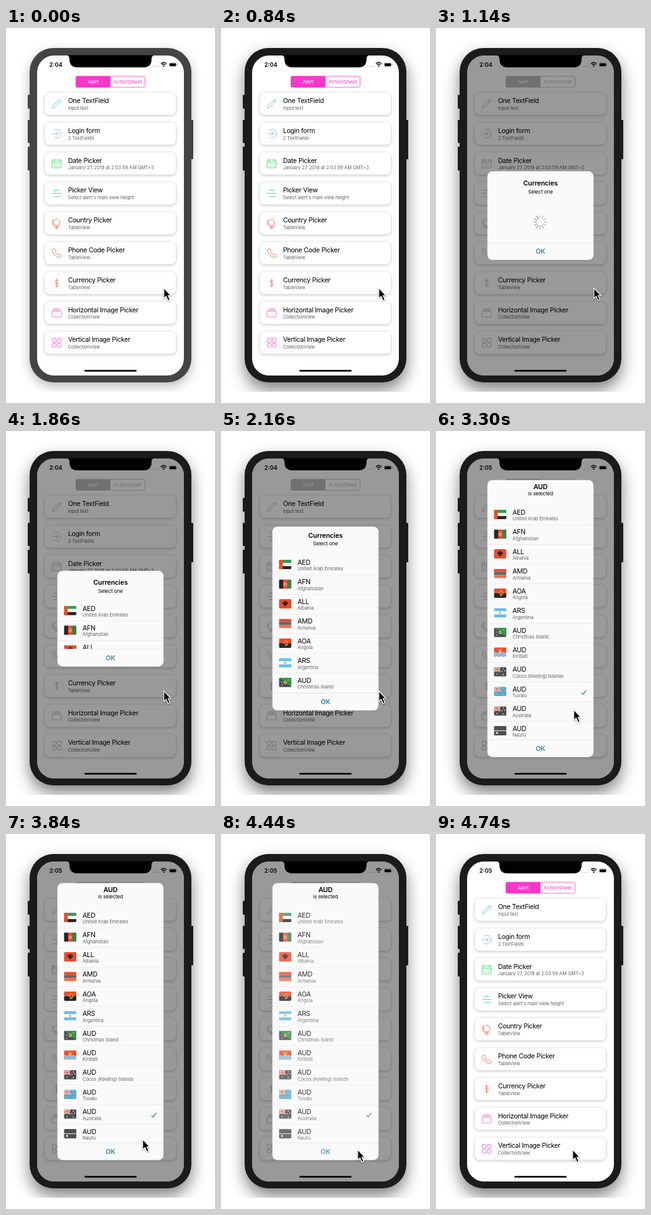
Recreate the animation shown at these times as an HTML page. Size 336 by 600 pixels, loop 4.98 s.

```html
<!DOCTYPE html>
<html lang="en">
<head>
<meta charset="utf-8">
<title>Currency picker</title>
<style>
html, body { margin: 0; width: 100%; height: 100%; overflow: hidden; background: #fff; }
#stage { display: block; width: 100vw; height: 100vh; }
text { font-family: Inter, Roboto, "Liberation Sans", sans-serif; }
.title { font-size: 10.7px; letter-spacing: -.31px; }
.note { font-size: 7.5px; letter-spacing: -.07px; fill: #626262; }
.small { font-size: 8.2px; letter-spacing: -.12px; }
.bold { font-size: 10.7px; font-weight: 600; letter-spacing: -.15px; }
.clock { font-size: 9.2px; font-weight: 600; }
.mid { text-anchor: middle; }
.card { fill: #fff; filter: drop-shadow(0 1.6px 2.6px rgba(0,0,0,.26)); }
.icon { fill: none; stroke-width: .85; stroke-linecap: round; stroke-linejoin: round; }
.tint { stroke: #fa38c8; }
.tintFill { fill: #fa38c8; }
.dim .icon { stroke: #b2b2b2; }
.dim .tint { stroke: #bcb8ba; }
.dim .tintFill { fill: #bcb8ba; }
#body { fill: #444; }
#shadow { opacity: .28; filter: blur(9px); transform: translateY(6px); }
.active #body { fill: #1b1b1b; }
.active #shadow { opacity: .5; filter: blur(13px); transform: translateY(12px); }
#cursor { filter: drop-shadow(0 1px 1px rgba(0,0,0,.35)); }
</style>
</head>
<body>
<svg id="stage" viewBox="0 0 336 600"></svg>
<script>
const LOOP = 4980, STEP = 60;
const stage = document.getElementById('stage');

const text = (x, y, cls, str, extra = '') =>
  `<text x="${x}" y="${y}" class="${cls}" ${extra}>${str}</text>`;
const rect = (x, y, w, h, fill, r = 0) =>
  `<rect x="${x}" y="${y}" width="${w}" height="${h}" rx="${r}" fill="${fill}"/>`;
const path = (d, fill, extra = '') => `<path d="${d}" fill="${fill}" ${extra}/>`;
const dot = (x, y, r, fill) => `<circle cx="${x}" cy="${y}" r="${r}" fill="${fill}"/>`;

// Main list
const BLUE = '#5fc3ee', GREEN = '#45cf6a', ORANGE = '#f2623c', PINK = '#f25ed2';
const cards = [
  ['One TextField', 'Input text', BLUE,
    'M-7 7l1.2-4.2L4.5-6.6q1-.8 2 .2t.2 2L-3.2 5.6zM3-5.4l2.4 2.4'],
  ['Login form', '2 TextFields', BLUE,
    'M-4-5.6a7 7 0 1 1 0 11.2M-7 0H2.5M-.5-3L2.5 0L-.5 3'],
  ['Date Picker', 'January 27, 2018 at 2:03:59 AM GMT+3', GREEN,
    'M-7-5.5h14v12.5h-14zM-7-2.2h14M-4-7v3M4-7v3M-4.4.8h1M-1.4.8h1M1.6.8h1M4.4.8h.6M-4.4 4h1M-1.4 4h1M1.6 4h1'],
  ['Picker View', "Select alert's main view height", GREEN, 'M-4.5-5H4M-7 0H7M-4 5H6'],
  ['Country Picker', 'TableView', ORANGE,
    'M5.2-1.2a5.2 5.2 0 1 0-10.4 0a5.2 5.2 0 1 0 10.4 0M-4.9-6.2A7 7 0 1 0 5 3.8M0 6v1.8M-3 7.8h6'],
  ['Phone Code Picker', 'TableView', ORANGE,
    'M-6.5-5.5q2-2.5 3.3-1l2 2.6q.6 1-.8 2.2q1 3 4.2 4.3q1.3-1.5 2.3-.8l2.6 1.8q1.3 1.2-1 3q-2 1.5-6-1q-5-3.2-6.6-7.3q-.7-2.2 0-3.8z'],
  ['Currency Picker', 'TableView', ORANGE,
    'M2.6-2.6q-.4-2-2.6-2q-2.6 0-2.6 2.2q0 1.9 2.6 2.4q2.6.6 2.6 2.4q0 2.2-2.6 2.2q-2.4 0-2.6-2M0-6.6V6.6'],
  ['Horizontal Image Picker', 'CollectionView', PINK,
    'M-6.5-2.5h13q1 0 1 1v7q0 1-1 1h-13q-1 0-1-1v-7q0-1 1-1zM-6.3-4.6h12.6M-4.6-6.6h9.2'],
  ['Vertical Image Picker', 'CollectionView', PINK,
    [[-7, -7], [1, -7], [-7, 1], [1, 1]].map(([x, y]) =>
      `M${x + 1.5} ${y}h3q1.5 0 1.5 1.5v3q0 1.5-1.5 1.5h-3q-1.5 0-1.5-1.5v-3q0-1.5 1.5-1.5z`).join('')]
];

const cardMarkup = ([title, note, color, icon], i) => {
  const y = 103.5 + 47.8 * i;
  return `<rect class="card" x="62.5" y="${y}" width="210.5" height="35.5" rx="7.5"/>
    <path class="icon" d="${icon}" stroke="${color}" transform="translate(81.5 ${y + 17.7})"/>` +
    text(99.7, y + 16.4, 'title', title) + text(99.7, y + 27.2, 'note', note);
};

// Flags, 20 by 15
const RED = '#ee4b2b', INK = '#262626', NAVY = '#4a4d52', SKY = '#62bff0', GOLD = '#f3b64a';
const bands = (...colors) =>
  colors.map((c, i) => rect(0, i * 15 / colors.length, 20, 15 / colors.length + .1, c)).join('');
const jack = path('M0 0L10 7.5M10 0L0 7.5M5 0V7.5M0 3.75H10', 'none', 'stroke="#fff" stroke-width="2"') +
  path('M0 0L10 7.5M10 0L0 7.5M5 0V7.5M0 3.75H10', 'none', `stroke="${RED}" stroke-width=".9"`);
const stars = color => [[15, 2.8], [12.7, 6.8], [17.3, 6], [15, 12], [5, 11.3]]
  .map(([x, y]) => dot(x, y, .85, color)).join('');

const rows = [
  ['AED', 'United Arab Emirates', bands('#2f9e4f', '#fff', INK) + rect(0, 0, 6, 15, RED)],
  ['AFN', 'Afghanistan', rect(0, 0, 7, 15, INK) + rect(6.7, 0, 7, 15, RED) +
    rect(13.3, 0, 7, 15, '#35804a') + dot(10, 7.5, 2.6, '#f3b3a4') + dot(10, 7.5, 1.3, RED)],
  ['ALL', 'Albania', bands(RED) +
    path('M10 4L8.5 2.6 7.7 4 9 5.5 5.5 4.5 6 8 8.5 9 7.5 11 9.2 10.5 10 12.8 10.8 10.5 12.5 11 11.5 9 14 8 14.5 4.5 11 5.5 12.3 4 11.5 2.6z', INK)],
  ['AMD', 'Armenia', bands(RED, '#66666a', '#f2704c')],
  ['AOA', 'Angola', bands(RED, INK) +
    path('M9 4.5a3.6 3.6 0 1 1 0 6.5M7 6l6 5', 'none', `stroke="${GOLD}" stroke-width="1.1"`)],
  ['ARS', 'Argentina', bands(SKY, '#fff', SKY) + dot(10, 7.5, 2, GOLD)],
  ['AUD', 'Christmas Island', bands(NAVY) + path('M0 0H20V15z', '#35924d') +
    dot(10, 7.5, 2.6, GOLD) + dot(10, 7.5, 1.2, '#35924d') + path('M13 4l4-1.5-1.5 2z', GOLD) +
    dot(4, 7, .8, '#fff') + dot(5, 11.5, .8, '#fff')],
  ['AUD', 'Kiribati', bands(RED) + dot(10, 7, 2.6, GOLD) + path('M6 3.5q2-1.5 4 .5q2-2 4-.5', 'none', `stroke="${GOLD}"`) +
    rect(0, 8, 20, 7, '#4c8fbe') + [9, 11.4, 13.8].map(y =>
      path(`M0 ${y}q1.7-1.6 3.3 0t3.3 0 3.4 0 3.3 0 3.4 0 3.3 0`, 'none', 'stroke="#fff" stroke-width="1"')).join('')],
  ['AUD', 'Cocos (Keeling) Islands', bands(NAVY) + jack + stars('#fff')],
  ['AUD', 'Tuvalu', bands('#5aa9cf') + jack + stars(GOLD)],
  ['AUD', 'Australia', bands(NAVY) + jack + stars('#fff')],
  ['AUD', 'Nauru', bands(NAVY) + rect(0, 6.8, 20, 1.4, '#d9c9a4') + dot(5, 11, 1.5, '#fff')]
];
const PITCH = 31.45;

const rowMarkup = ([code, place, flag], i) => `<g transform="translate(0 ${i * PITCH})">
  ${i ? rect(0, 0, 171, .5, '#dedede') : ''}
  <g transform="translate(10.6 7.6)" clip-path="url(#flagClip)">${flag}</g>
  ${text(40.4, 15.4, 'title', code)}${text(40.4, 24.8, 'note', place)}</g>`;

const spokes = Array.from({ length: 12 }, (_, i) =>
  `<rect x="-.8" y="-11.5" width="1.6" height="6" rx=".8" fill="#777"
    opacity="${.22 + .5 * i / 11}" transform="rotate(${i * 30})"/>`).join('');

stage.innerHTML = `
<defs>
  <clipPath id="stageClip"><rect width="336" height="582"/></clipPath>
  <clipPath id="screenClip"><rect x="50" y="44" width="236" height="512" rx="27"/></clipPath>
  <clipPath id="flagClip"><rect width="20" height="15" rx="1.8"/></clipPath>
</defs>
<g clip-path="url(#stageClip)"><rect id="shadow" x="38" y="32" width="260" height="535" rx="38"/></g>
<g id="body">
  <rect x="38" y="32" width="260" height="535" rx="38"/>
  <rect x="35" y="107" width="6" height="22" rx="1"/>
  <rect x="35" y="147" width="6" height="37" rx="1"/>
  <rect x="35" y="190" width="6" height="38" rx="1"/>
  <rect x="295" y="147" width="6" height="63" rx="1"/>
</g>
<g clip-path="url(#screenClip)">
  ${rect(50, 44, 236, 512, '#fff')}
  ${text(69.8, 62.2, 'clock', '2:04', 'id="clock"')}
  ${[0, 1, 2, 3].map(i => dot(236 + i * 2.9, 61.2, .75, '#b0b0b0')).join('')}
  ${path('M249 57.2q4.6-4.2 9.2 0M250.7 59q2.9-2.5 5.8 0', 'none', 'stroke="#000" stroke-width="1.4"')}
  ${path('M252 60.6q1.6-1.3 3.2 0l-1.6 1.8z', '#000')}
  <rect x="262.3" y="55.8" width="11.6" height="6" rx="1.6" fill="none" stroke="#888" stroke-width=".5"/>
  ${rect(263, 56.5, 10.2, 4.6, '#000', 1)}${rect(274.6, 57.8, .8, 2, '#888', .4)}
  <rect class="tint" x="112.5" y="77.2" width="111" height="17.6" rx="2.6" fill="none" stroke-width=".8"/>
  <path class="tintFill" d="M168 77v18h-53q-3 0-3-3v-12q0-3 3-3z"/>
  ${text(140, 89, 'small mid', 'Alert', 'fill="#fff"')}
  ${text(195.7, 89, 'small mid tintFill', 'ActionSheet')}
  ${cards.map(cardMarkup).join('')}
  ${rect(126, 547, 84, 2.8, '#000', 1.4)}
  <rect id="veil" x="50" y="44" width="236" height="512"/>
</g>
<use href="#notch"/>
<g id="alert">
  <rect id="panel" x="82.6" width="170.6" rx="8" fill="#fafafa"/>
  ${text(168, 0, 'bold mid', '', 'id="heading"')}
  ${text(168, 0, 'small mid', '', 'id="detail"')}
  <g id="spinner">${spokes}</g>
  <svg id="table" x="82.6" width="170.6">${rows.map(rowMarkup).join('')}
    <path id="check" d="M151.2 17l2.8 2.9 5-6.8" fill="none" stroke="#3c8fbe" stroke-width="1.4"/></svg>
  <rect id="rule" x="82.6" width="170.6" height=".5" fill="#d8d8d8"/>
  ${text(168, 0, 'bold mid', 'OK', 'id="ok" fill="#3a86b0"')}
</g>
<path id="cursor" d="M0 0V16.5L3.7 13.2L6.7 20L9.7 18.7L6.7 12H11.3Z" stroke="#fff" stroke-width="1.2"/>`;

// The notch shares the body colour
document.getElementById('body').insertAdjacentHTML('beforeend',
  '<path id="notch" d="M97 43.5q5 .5 5 6q0 13.5 13 13.5h106q13 0 13-13.5q0-5.5 5-6z"/>');

const el = id => document.getElementById(id);
const set = (id, attrs) => {
  for (const name in attrs) el(id).setAttribute(name, attrs[name]);
};
const smooth = x => x * x * (3 - 2 * x);

// Value at time t from keys [time, ...values]
function track(keys, t, ease = smooth) {
  let i = keys.length - 1;
  while (i > 0 && keys[i][0] > t) i--;
  const a = keys[i], b = keys[i + 1];
  if (!b || t < a[0]) return a.slice(1);
  const k = ease((t - a[0]) / (b[0] - a[0]));
  return a.slice(1).map((v, n) => v + (b[n + 1] - v) * k);
}

// time, top, bottom, heading baseline, detail baseline, table top
const layout = [
  [1800, 229.3, 371, 252, 264.8, 278],
  [2160, 153, 447, 171.4, 183, 198.5],
  [2280, 153, 447, 171.4, 183, 198.5],
  [2700, 78.5, 521.7, 92.8, 103.3, 118.5]
];
const pointer = [
  [2280, 253.8, 416], [2700, 222.6, 405], [2940, 222.6, 405], [3360, 221.5, 448.5],
  [3540, 221.5, 448.5], [3840, 219.8, 488.5], [4020, 219.8, 505]
];

function draw(t) {
  const open = t >= 1140 && t < 4740;
  const fade = !open ? 0 : t >= 4620 ? .5 : 1;
  stage.classList.toggle('active', t >= 840);
  stage.classList.toggle('dim', open && t < 4620);
  el('clock').textContent = t < 2520 ? '2:04' : '2:05';
  set('veil', { opacity: .4 * fade });
  set('alert', { opacity: fade });

  const [top, bottom, heading, detail, list] = track(layout, t);
  const picked = t >= 3000, loaded = t >= 1860;
  set('panel', { y: top, height: bottom - top });
  set('heading', { y: heading });
  set('detail', { y: detail });
  el('heading').textContent = picked ? 'AUD' : 'Currencies';
  el('detail').textContent = picked ? 'is selected' : 'Select one';
  const turn = Math.max(0, Math.floor((t - 1245) / 67)) * 30;
  set('spinner', { transform: `translate(167.6 310.5) rotate(${turn})`, opacity: loaded ? 0 : 1 });
  const pressed = t >= 4440 ? .8 : t >= 4320 ? .9 : 1;
  set('table', { y: list, height: Math.max(0, bottom - 28 - list), opacity: loaded ? pressed : 0 });
  set('check', { transform: `translate(0 ${PITCH * (t < 3540 ? 9 : 10)})`, opacity: picked ? 1 : 0 });
  set('rule', { y: bottom - 28 });
  set('ok', { y: bottom - 9.8, opacity: pressed });

  const [x, y] = track(pointer, t);
  set('cursor', { transform: `translate(${x} ${y})` });
}

const start = performance.now();
function tick() {
  const t = (performance.now() - start) % LOOP;
  draw(Math.floor(t / STEP) * STEP);
  requestAnimationFrame(tick);
}
draw(0);
tick();
</script>
</body>
</html>
```
